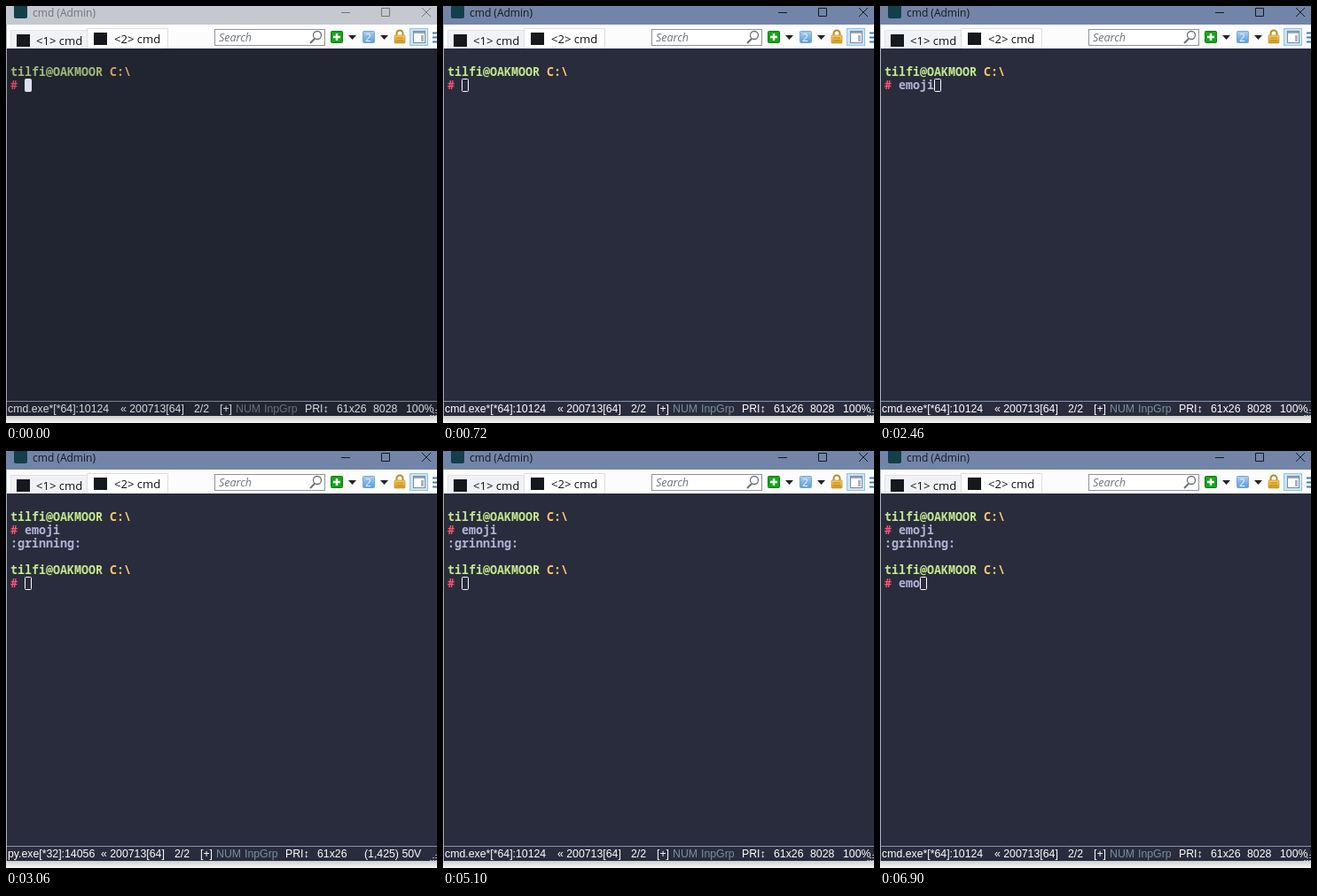
An HTML page that plays this animation: 486x471 px, repeating every 7.08 s.

```html
<!DOCTYPE html>
<html lang="en">
<head>
<meta charset="utf-8">
<title>Terminal session</title>
<style>
html, body { margin: 0; width: 100%; height: 100%; overflow: hidden; background: #f4f4f4; }
svg {
  display: block; width: 486px; height: 471px;
  --bar: #7285a8; --title: #14171f; --bg: #292c3c; --edge: #8494ad;
  --green: #c3e88d; --yellow: #ffcb6b; --red: #ff5370; --fg: #b0b4d6;
  --status: #fff; --off: #78909c;
}
svg.idle {
  --bar: #c5c8ce; --title: #707378; --bg: #212431; --edge: #7c8490;
  --green: #9fba76; --yellow: #d6a65c; --red: #d9465f;
  --status: #d9d9dc; --off: #6b7079;
}
text { white-space: pre; }
.ui { font-family: "Open Sans", "Noto Sans", sans-serif; }
.mono { font: 600 13.33px "Noto Sans Mono", "DejaVu Sans Mono", monospace; }
.status { font: 12.3px "Liberation Sans", Arial, sans-serif; fill: var(--status); }
.title { fill: var(--title); }
.wire { stroke: var(--title); fill: none; }
.green { fill: var(--green); } .yellow { fill: var(--yellow); }
.red { fill: var(--red); } .fg { fill: var(--fg); } .off { fill: var(--off); }
#cursor { fill: none; stroke: #fff; }
.idle #cursor { fill: #dcdff0; stroke: #dcdff0; }
</style>
</head>
<body>
<svg id="stage" viewBox="0 0 486 471" class="idle">
  <defs>
    <linearGradient id="shadow" x2="0" y2="1">
      <stop stop-color="#cdcfd2"/><stop offset="1" stop-color="#f6f6f6"/>
    </linearGradient>
    <linearGradient id="blue" x2="0" y2="1">
      <stop stop-color="#a9d0f2"/><stop offset="1" stop-color="#5c9bd8"/>
    </linearGradient>
    <linearGradient id="gold" x2="0" y2="1">
      <stop stop-color="#f7cf5e"/><stop offset="1" stop-color="#d39a1c"/>
    </linearGradient>
    <g id="prompt" class="mono">
      <text x="5" y="79"><tspan class="green">tilfi@OAKMOOR</tspan><tspan class="yellow"> C:\</tspan></text>
      <text x="5" y="94" class="red">#</text>
    </g>
  </defs>

  <rect width="486" height="471" fill="#e6e8ea"/>
  <rect y="463" width="486" height="8" fill="url(#shadow)"/>
  <rect width="486" height="21" fill="var(--bar)"/>

  <g class="ui">
    <rect x="9" y="-2" width="15" height="16" rx="2" fill="#133f4b"/>
    <text id="title" class="title" x="30" y="12" font-size="12">cmd (Admin)</text>
    <path class="wire" d="M378 7.5h10M423.5 2.5h9v9h-9zM469 2l10 10m0-10l-10 10"/>
    <rect x="1" y="21" width="485" height="27" fill="#fcfcfd"/>
    <path d="M5.500 48V27.500H91.500V48" fill="#f0f2f5" stroke="#dfe1e6"/>
    <path d="M91.500 48V25.500H182.500V48" fill="#fff" stroke="#dcdee3"/>
    <rect x="12" y="32" width="15" height="14" fill="#15181c"/>
    <rect x="99" y="30" width="15" height="14" fill="#15181c"/>
    <g font-size="13.1" fill="#101010">
      <text x="34" y="44">&lt;1&gt; cmd</text>
      <text id="tab" x="122" y="42">&lt;2&gt; cmd</text>
    </g>
    <rect x="235.500" y="26.500" width="124" height="18" fill="#fff" stroke="#8e9299"/>
    <text x="240" y="39.500" font-size="12.500" font-style="italic" fill="#70747a">Search</text>
    <circle cx="351" cy="33" r="4.500" fill="none" stroke="#6a6e75" stroke-width="1.300"/>
    <path d="M348 37l-5 5" stroke="#6a6e75" stroke-width="2"/>
    <rect x="366.500" y="28.500" width="13" height="13" rx="1" fill="#17a51d" stroke="#0b7e12"/>
    <path d="M373 31v8m-4-4h8" stroke="#fff" stroke-width="2.400"/>
    <path d="M386 33h9l-4.500 5zM422 33h9l-4.500 5z" fill="#222"/>
    <rect x="402.500" y="28.500" width="13" height="13" rx="1" fill="url(#blue)" stroke="#7aa6d2"/>
    <text x="405" y="40" font-size="12" fill="#e9f4ff">2</text>
    <path d="M440.500 34v-3a3.500 3.500 0 0 1 7 0v3" fill="none" stroke="#b98a22" stroke-width="2"/>
    <rect x="438" y="33" width="12" height="9" rx="1" fill="url(#gold)" stroke="#b5862a" stroke-width=".6"/>
    <path d="M440 36h8m-8 3h8" stroke="#a87818" stroke-width=".7"/>
    <rect x="455.500" y="25.500" width="20" height="19" fill="#cbe4f8" stroke="#8fc3ec"/>
    <rect x="459.500" y="28.500" width="13" height="13" fill="#fff" stroke="#7d8997"/>
    <path d="M460 30h12" stroke="#98a5b5" stroke-width="2"/>
    <path d="M468 33h3v7h-3z" fill="#a9b4c1"/>
    <path d="M481 30.500h5m-5 5h5m-5 5h5" stroke="#3c7eb5" stroke-width="2"/>
  </g>

  <rect x="1" y="48" width="485" height="415" fill="var(--bg)"/>
  <path d="M1 446.500h485" stroke="var(--edge)"/>
  <path d="M.5 21v442" stroke="var(--edge)" opacity=".6"/>

  <use href="#prompt"/>
  <g class="mono fg">
    <text id="first" x="21" y="94"></text>
    <g id="reply">
      <text x="5" y="109">:grinning:</text>
      <use href="#prompt" y="60"/>
      <text id="second" x="21" y="154"></text>
    </g>
  </g>
  <rect id="cursor" width="7" height="14" rx="1"/>

  <g class="status">
    <text id="process" x="2" y="459"></text>
    <g id="fields">
      <text x="129" y="459">« 200713[64]</text><text x="212" y="459">2/2</text>
      <text x="241" y="459">[+]</text><text x="259" y="459" class="off">NUM</text>
      <text x="291" y="459" class="off">InpGrp</text><text x="337" y="459">PRI↕</text>
      <text x="373" y="459">61x26</text>
    </g>
    <g id="size"><text x="414" y="459">8028</text><text x="451" y="459">100%</text></g>
    <text id="pos" x="404" y="459">(1,425) 50V</text>
  </g>
  <path d="M485 456v1m0 2v1m-3-1v1m3 2v1m-3-1v1m-3-1v1" stroke="#a0a8b4" stroke-width="2"/>
  <g id="switcher" class="ui"></g>
</svg>

<script>
const LOOP = 7080;
const $ = id => document.getElementById(id);
const show = (id, on) => $(id).setAttribute('visibility', on ? 'visible' : 'hidden');

let seed = 17;
const rnd = () => (seed = seed * 16807 % 2147483647) / 2147483647;

const box = (x, y, w, h, fill) =>
  `<rect x="${x}" y="${y}" width="${w}" height="${h}" fill="${fill}"/>`;
const label = (x, y, size, fill, s) =>
  `<text x="${x}" y="${y}" font-size="${size}" fill="${fill}">${s}</text>`;
const labels = (x, y, step, size, fill, list) =>
  list.split('|').map((s, i) => label(x, y + i * step, size, fill, s)).join('');

// Rows of word-like dashes standing for unreadable text.
function rows(x, y, n, step, width, colors, indent = 0, h = 1) {
  let out = '';
  for (let i = 0; i < n; i++) {
    let at = x + Math.floor(rnd() * 4) * indent;
    const end = x + width * (0.45 + 0.55 * rnd());
    while (at < end) {
      const w = Math.min(3 + rnd() * 9, x + width - at);
      if (w < 1) break;
      out += box(at.toFixed(1), y + i * step, w.toFixed(1), h, colors[Math.floor(rnd() * colors.length)]);
      at += w + 1.5;
    }
  }
  return out;
}

function webPage() {
  return box(0, 0, 211, 160, '#fff') +
    labels(0, 12, 5, 3.3, '#555', 'Between the lines and the marks at the border you can find out|message there. They should use the emoji') +
    label(0, 26, 3.3, '#555', 'message type, like the emoji below') + '<circle cx="73" cy="24" r="2" fill="#e4b52c"/>' +
    [34, 42, 50, 69, 87, 98].map(y => `<path d="M0 ${y}.5h89" stroke="#d9dde2" stroke-dasharray="1 1"/>`).join('') +
    label(0, 64, 3.3, '#555', 'packages folder, this will make it run anywhere') +
    label(0, 82, 3.3, '#555', 'go, large on some folders, names and more, but just type') +
    label(0, 106, 3.3, '#555', 'page: I would use this if needed as it opens after the code is added') +
    label(103, 4, 3.5, '#4b83c4', 'Releases') +
    label(103, 27, 4, '#222', 'Packages') + label(103, 33, 3, '#777', 'No packages published') +
    label(103, 48, 4, '#222', 'Languages') + box(103, 53, 45, 2, '#3b6f9e') +
    label(105, 60, 3, '#777', 'Python 100%') +
    'Terms|Help|Docs|API|Jobs|Blog|About'.split('|').map((s, i) => label(26 + i * 19, 151, 3, '#4b83c4', s)).join('');
}

function fileBrowser() {
  const names = 'Things to sort|Work notes|Drawings|Workshop|Open review|Events|Gallery|F_PICS|_CODE|_IMGS|_OLDER|src|Long file list';
  let out = box(224, 0, 236, 160, '#fff') + box(224, 0, 236, 22, '#1d1e20') + box(224, 22, 236, 5, '#000');
  for (let x = 232; x < 455; x += 17) {
    out += box(x, 0, 6, 4, ['#b9bec4', '#5b9bd5', '#d8b04c'][x % 3]) + box(x - 3, 7, 11, 1, '#bbb') + box(x - 1, 11, 8, 1, '#888');
  }
  out += '<path d="M319 0l6 6m0-6l-6 6" stroke="#e23b30" stroke-width="2"/>' +
    [[250, 'Clipboard'], [307, 'Organize'], [352, 'New'], [386, 'Open'], [430, 'Select']]
      .map(([x, s]) => label(x, 19, 4, '#aaa', s)).join('') +
    label(252, 35, 4, '#333', '› This PC › Desktop › cmoji') + label(431, 35, 3.5, '#777', 'Search cmoji') +
    '<path d="M224 38.500h236M264.500 39v121" stroke="#dfe2e6" fill="none"/>' +
    box(224, 155, 40, 5, '#cfe6f7') +
    labels(237, 43, 6.2, 3.8, '#333', names) +
    labels(235, 123.6, 6.2, 3.8, '#333', 'CloudDisk|Documents|Music|Pictures|This PC|3D Objects|Desktop');
  for (let i = 0; i < 20; i++) out += box(231, 39.5 + i * 6.2, 3.5, 3.5, i < 13 ? '#f2c94c' : '#4b9bd8');
  return out + box(270, 41, 25, 22, '#1b2736') + rows(271, 44, 6, 3, 22, ['#2e5061', '#2b3d52']) +
    label(272, 69, 4, '#333', 'cmoji_cli.gif');
}

function gitClient() {
  const grey = ['#565c66', '#858b95', '#6a717b'];
  return box(22, 205, 172, 176, '#1d2027') + box(22, 205, 172, 5, '#e4e6e9') +
    rows(26, 214, 2, 6, 160, ['#7b828e', '#343943', '#2a2e37']) +
    box(22, 224, 36, 150, '#242831') + rows(27, 230, 16, 9, 26, grey) +
    box(22, 241, 36, 7, '#26463a') +
    box(58, 224, 67, 150, '#0d1016') + box(60, 228, 17, 4, '#1d6b76') +
    rows(95, 229, 27, 5.4, 27, ['#8b929d', '#5e6671', '#a6acb5']) +
    '<path d="M80.500 226v148" stroke="#1b7581"/><path d="M91 228v146" stroke="#8fb6bb" stroke-dasharray="3 2.400" stroke-width="3"/>' +
    box(125, 224, 69, 150, '#292d35') +
    label(139, 231, 4.3, '#e4e7ea', 'What parent images') +
    rows(131, 242, 3, 7, 40, grey) + box(129, 263, 61, 1, '#454b55') +
    rows(131, 270, 3, 7, 48, ['#4c535e', '#3d444e']) +
    box(22, 374, 172, 7, '#15181d') + rows(82, 377, 1, 4, 70, ['#8d949d']) +
    box(176, 377, 8, 4, '#e2722b') + box(186, 377, 5, 4, '#c83e3e');
}

function editor() {
  const code = ['#59617d', '#6b5b8f', '#416f86', '#8b7650', '#70778d', '#7b4e68'];
  return box(208, 205, 161, 176, '#20232d') + box(208, 205, 161, 5, '#eceef0') +
    box(208, 210, 161, 7, '#191b20') + rows(212, 212, 1, 5, 120, ['#555b64']) +
    box(208, 217, 32, 159, '#1b1c1f') + rows(213, 223, 19, 6, 18, ['#4e535b', '#62676f'], 1) +
    box(208, 329, 32, 5, '#2c2d31') + box(215, 331, 14, 1, '#b68a42') +
    rows(247, 220, 43, 3.6, 82, code, 6) + box(247, 267, 54, 1, '#b9a15f') + box(282, 301, 38, 1, '#c9c76d') +
    rows(355, 220, 40, 2, 11, ['#454d62', '#51446a', '#35596b']) +
    box(337, 339, 9, 3, '#2a9d8f') + box(208, 376, 161, 5, '#1f2023') + rows(212, 378, 1, 4, 145, ['#666b73']);
}

function sideEditor() {
  const vivid = ['#e9e9ee', '#8f68d8', '#e5c23e', '#df4060', '#47a8dc', '#e67fb0'];
  return box(385, 205, 101, 176, '#1b1c1f') + box(385, 205, 101, 6, '#f2f3f4') +
    label(390, 210, 4, '#333', 'File  Edit  Selection  Find  View  Goto  Tools') +
    label(391, 227, 4.2, '#b4b8be', 'OPEN FILES') +
    labels(394, 236, 8, 4, '#777d85', 'cmoji.py|emoji.py|Emoji list') +
    box(385, 231, 62, 6, '#2b2d31') + label(392, 235.5, 4, '#c68a37', 'cmoji.py') +
    label(391, 275, 4.2, '#b4b8be', 'FOLDERS') +
    rows(400, 283, 12, 8, 26, ['#646a72', '#535961'], 1) +
    box(385, 327, 62, 6, '#2b2d31') + box(401, 329, 22, 1, '#c68a37') +
    box(447, 219, 39, 157, '#1e212b') + rows(452, 226, 5, 6, 32, ['#5b6277', '#79628d']) +
    rows(451, 258, 17, 5.7, 9, ['#5b6277', '#e9e9ee']) +
    rows(463, 256, 17, 5.7, 23, vivid, 0, 4) + rows(452, 356, 3, 6, 28, ['#666d80']) +
    box(385, 376, 101, 5, '#1f2023') + rows(390, 378, 1, 4, 85, ['#696e76']);
}

const heading = (x, s) => label(x, 194, 11.6, '#f1f1f1', s);
const path = 'C:\\Users\\tilfi\\Desk...';
$('switcher').innerHTML = box(0, 0, 486, 410, '#171819') +
  webPage() + fileBrowser() + box(474, 0, 12, 158, '#fff') +
  labels(477, 11, 9.6, 6.5, '#222', '@echo|REM|REM|REM|REM|py') +
  '<circle cx="33" cy="189" r="11" fill="#1b8c88"/>' + heading(50, 'ForkHeron') +
  box(208, 177, 24, 24, '#f59a23') + heading(235, path) +
  box(384, 177, 24, 24, '#f59a23') + heading(411, path) +
  box(0, 205, 8, 176, '#f4f5f6') +
  gitClient() + editor() + sideEditor();

// Start time, first command, second command (null before the reply), cursor, mode.
const steps = [
  [0, '', null, 1, 'idle'], [660, '', null, 0, 'switch'], [720, '', null, 1], [1200, '', null, 0],
  [1440, 'e', null, 1], [1740, 'em', null, 1], [2220, 'emo', null, 1], [2340, 'emoj', null, 1],
  [2460, 'emoji', null, 1], [2880, 'emoji', null, 1, 'enter'], [2940, 'emoji', null, 1, 'run'],
  [3060, 'emoji', '', 1, 'done'], [3420, 'emoji', '', 1], [3540, 'emoji', '', 0],
  [4080, 'emoji', '', 1], [4560, 'emoji', '', 0], [5100, 'emoji', '', 1], [5580, 'emoji', '', 0],
  [6000, 'emoji', 'e', 1], [6480, 'emoji', 'e', 0], [6720, 'emoji', 'em', 1], [6900, 'emoji', 'emo', 1]
];

let current;
function render(step) {
  const [, first, second, cursor, mode] = step;
  const replied = second !== null;
  const running = mode === 'run';
  const waiting = running || mode === 'enter';
  const python = running || mode === 'done';

  $('stage').classList.toggle('idle', mode === 'idle' || mode === 'switch');
  $('first').textContent = first;
  $('second').textContent = second || '';
  show('reply', replied);
  show('switcher', mode === 'switch');

  const column = waiting ? 0 : 2 + (replied ? second : first).length;
  const row = waiting ? 1 : replied ? 4 : 0;
  $('cursor').setAttribute('x', 5.5 + column * 8);
  $('cursor').setAttribute('y', 82.5 + row * 15);
  show('cursor', cursor);

  const name = running ? 'py' : 'cmd';
  $('title').textContent = name + ' (Admin)';
  $('tab').textContent = '<2> ' + name;
  $('process').textContent = python ? 'py.exe[*32]:14056' : 'cmd.exe*[*64]:10124';
  $('fields').setAttribute('transform', `translate(${python ? -22 : 0})`);
  show('size', !python);
  show('pos', python);
}

function tick() {
  const t = performance.now() % LOOP;
  const step = steps.findLast(s => s[0] <= t);
  if (step !== current) render(current = step);
  requestAnimationFrame(tick);
}
tick();
</script>
</body>
</html>
```
